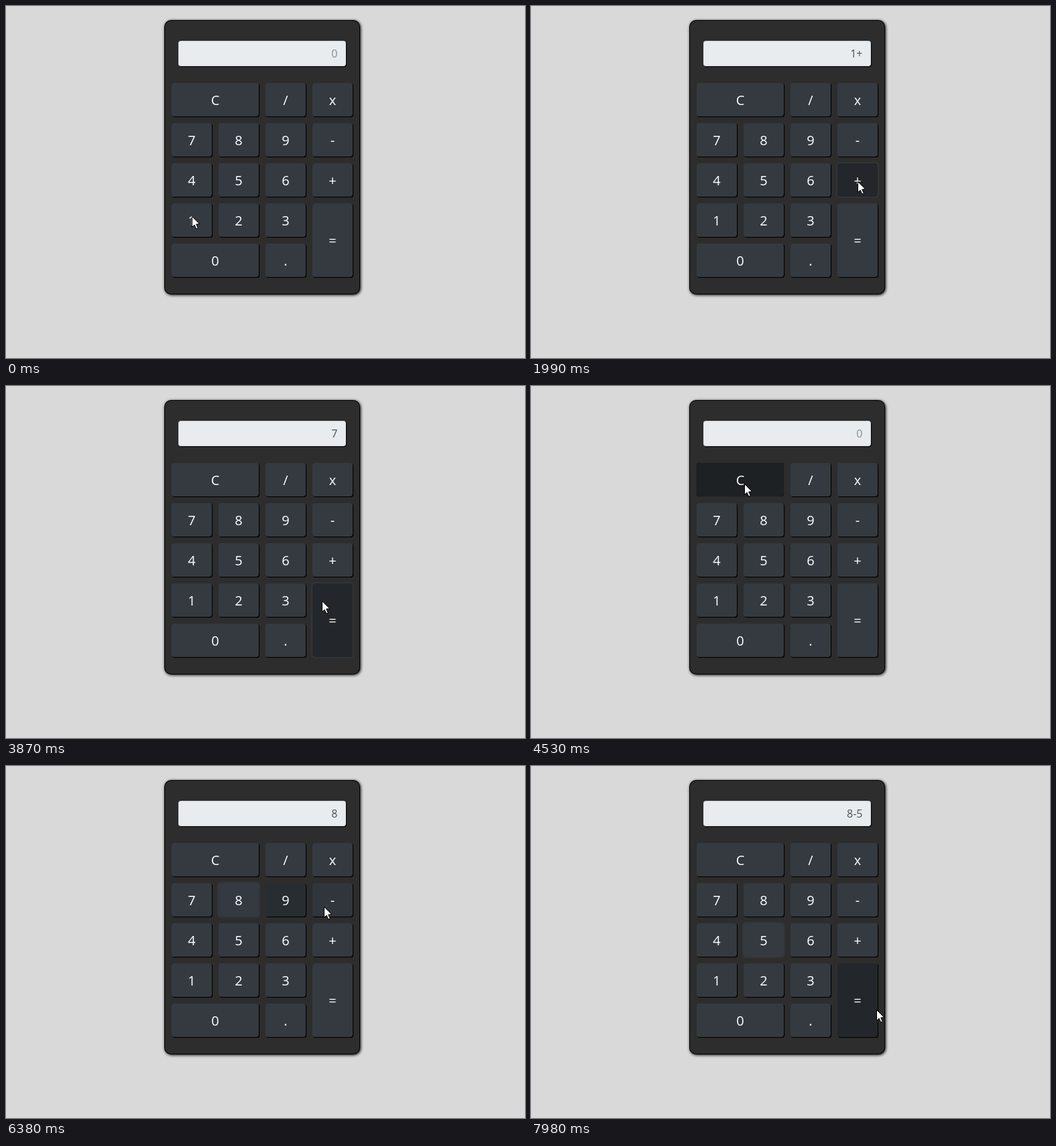
These frames come from a looping animation (774 by 526 pixels, 8 s). An HTML page with a canvas:

```html
<!DOCTYPE html>
<html lang="en">
<head>
<meta charset="utf-8">
<title>Calculator</title>
<style>
  html, body { margin: 0; width: 100%; height: 100%; overflow: hidden; background: #d9d9d9; }
  canvas { display: block; }
</style>
</head>
<body>
<canvas id="stage" width="774" height="526"></canvas>
<script>
const ctx = document.getElementById('stage').getContext('2d');
const LOOP = 8000, FADE = 80, HOLD = 90;
const FONT = '"Open Sans", "Noto Sans", sans-serif';
const BASE = [52, 58, 64], HOVER = [35, 39, 43], ACTIVE = [29, 33, 36], RING = [50, 53, 56];

// repeated labels span several cells
const grid = ['CC/x', '789-', '456+', '123=', '00.='];

const keys = [...new Set(grid.join(''))].map(label => {
  const cols = [0, 1, 2, 3].filter(c => grid.some(row => row[c] === label));
  const rows = [0, 1, 2, 3, 4].filter(r => grid[r].includes(label));
  return {
    label,
    x: 247 + cols[0] * 70, y: 115 + rows[0] * 60,
    w: cols.length * 70 - 10, h: rows.length * 60 - 10
  };
});

const clicks = [
  [1080, '1'], [1740, '+'], [2470, '6'], [3060, '='],
  [4440, 'C'], [5800, '8'], [6610, '-'], [7430, '5']
].map(([time, label]) => ({ time, label }));

// pointer moves: start, end, x, y
const home = [277, 314];
const moves = [
  [0, 300, 268, 304], [1140, 1200, 410, 272], [1380, 1560, 487, 262],
  [2230, 2420, 416, 260], [2640, 2890, 471, 321], [3870, 4400, 318, 146],
  [4730, 4930, 373, 216], [5200, 5500, 365, 214], [6200, 6380, 474, 210],
  [6800, 7250, 345, 268], [7560, 7980, 515, 364]
];

const mix = (a, b, k) => a.map((v, i) => v + (b[i] - v) * k);
const rgb = c => `rgb(${c.map(Math.round)})`;

function pointer(t) {
  let pos = home;
  for (const [from, to, ...goal] of moves) {
    if (t <= from) break;
    const k = Math.min(1, (t - from) / (to - from));
    pos = mix(pos, goal, k * k);
  }
  return pos;
}

function reading(t) {
  return clicks.filter(c => c.time <= t).reduce((text, { label }) => {
    if (label === 'C') return '';
    if (label !== '=') return text + label;
    const [a, b] = text.split('+').map(Number);
    return String(a + b);
  }, '');
}

// share of the last FADE ms in which a state held
function fade(test, t) {
  const n = 20;
  let hits = 0;
  for (let i = 0; i < n; i++) {
    const s = t - FADE * (i + 0.5) / n;
    if (s > 0 && test(s)) hits++;
  }
  return hits / n;
}

function isOver(key, t) {
  const [x, y] = pointer(t);
  return x >= key.x && x < key.x + key.w && y >= key.y && y < key.y + key.h;
}

// 'down' while held, then 'focus' until another key is pressed
function stateOf(key, t) {
  const last = clicks.filter(c => c.time <= t).pop();
  if (!last || last.label !== key.label) return 'idle';
  return t < last.time + HOLD ? 'down' : 'focus';
}

function box(x, y, w, h, r, fill) {
  ctx.beginPath();
  ctx.roundRect(x, y, w, h, r);
  ctx.fillStyle = fill;
  ctx.fill();
}

function shadedBox(x, y, w, h, r, fill, shade, blur, offset) {
  ctx.save();
  ctx.shadowColor = shade;
  ctx.shadowBlur = blur;
  ctx.shadowOffsetX = ctx.shadowOffsetY = offset;
  box(x, y, w, h, r, fill);
  ctx.restore();
}

function label(text, x, y, size, align, color) {
  ctx.font = `400 ${size}px ${FONT}`;
  ctx.textAlign = align;
  ctx.fillStyle = color;
  ctx.fillText(text, x, y);
}

function drawBody() {
  ctx.fillStyle = '#d9d9d9';
  ctx.fillRect(0, 0, 774, 526);
  shadedBox(236, 21, 292, 410, 10, '#000', '#000', 4, 1);
  box(237, 22, 290, 408, 9, '#2d2d2d');
}

function drawDisplay(t) {
  const text = reading(t);
  shadedBox(257, 52, 250, 38, 4, '#ced4da', '#000', 1, 1);
  box(258, 53, 248, 36, 3, '#e9ecef');
  label(text || '0', 494.5, 77, 16, 'right', text ? '#495057' : '#868c8c');
}

function drawKey(key, t) {
  const { x, y, w, h } = key;
  const over = fade(s => isOver(key, s), t);
  const down = fade(s => stateOf(key, s) === 'down', t);
  const focus = fade(s => stateOf(key, s) === 'focus', t);

  const spread = focus * 2, shift = 1 - focus - down - spread;
  const edge = rgb(mix([0, 0, 0], RING, focus));
  shadedBox(x + shift, y + shift, w + spread * 2, h + spread * 2, 4 + spread, edge, edge, 1, 0);
  box(x, y, w, h, 4, rgb(mix(mix(BASE, HOVER, over), ACTIVE, down)));
  label(key.label, x + w / 2, y + h / 2 + 8, 20, 'center', '#fff');
}

function drawPointer(t) {
  const [x, y] = pointer(t).map(Math.round);
  ctx.save();
  ctx.translate(x + 0.5, y + 0.5);
  ctx.fillStyle = '#fff';
  ctx.strokeStyle = '#000';
  const arrow = new Path2D('M0 0V16L3.6 12.6 6.3 18.6 8.8 17.5 6.2 11.6 11.2 11.2Z');
  ctx.fill(arrow);
  ctx.stroke(arrow);
  ctx.restore();
}

let start;
function frame(now) {
  start ??= now;
  const t = (now - start) % LOOP;
  drawBody();
  drawDisplay(t);
  keys.forEach(key => drawKey(key, t));
  drawPointer(t);
  requestAnimationFrame(frame);
}
requestAnimationFrame(frame);
</script>
</body>
</html>
```
